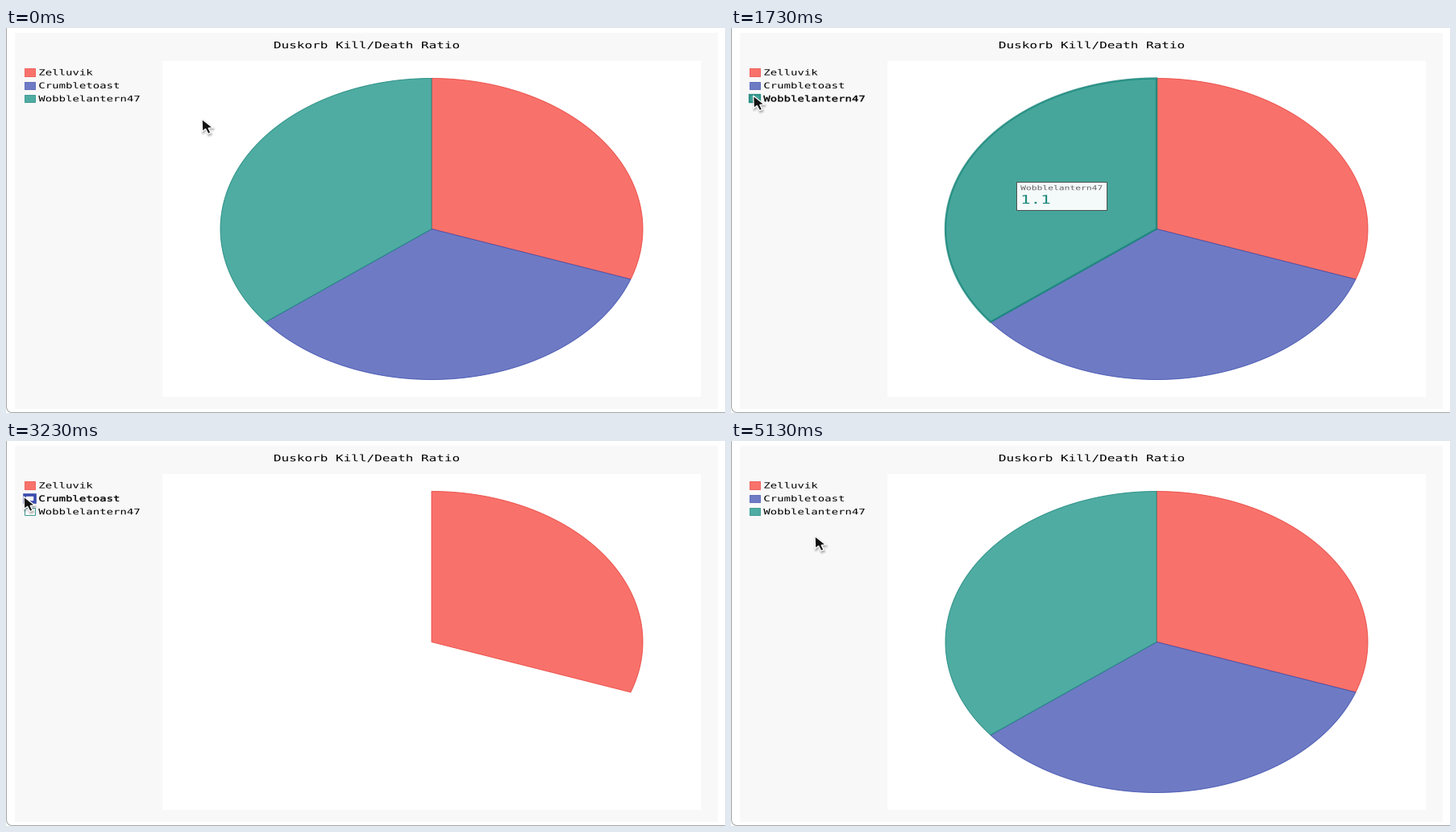
A matplotlib script that plays this animation: 892x478 px, repeating every 5.17 s.

```python
import numpy as np
import matplotlib.pyplot as plt
from matplotlib.animation import FuncAnimation
from matplotlib.colors import to_rgb
from matplotlib.patches import PathPatch, Polygon, Rectangle
from matplotlib.path import Path
from matplotlib.textpath import TextPath
from matplotlib.transforms import Affine2D

W, H, DPI = 892, 478, 100
PX = 72 / DPI                # points per pixel
LOOP, STEP = 5170, 22
CENTER, RADIUS = np.array([528, 249.5]), 262
SQUASH = 187 / 262           # the whole chart is flattened vertically
CHAR = 0.602                 # monospace advance in em
ROW = 16.3                   # legend line spacing

plt.rcParams["font.family"] = "DejaVu Sans Mono"

fig = plt.figure(figsize=(W / DPI, H / DPI), dpi=DPI, facecolor="white")
ax = fig.add_axes([0, 0, 1, 1])
ax.set_xlim(0, W)
ax.set_ylim(H, 0)
ax.axis("off")


def add(patch):
    ax.add_patch(patch)
    return patch


def box(x0, y0, x1, y1, color):
    return add(Rectangle((x0, y0), x1 - x0, y1 - y0, fc=color, lw=0))


def glyphs(text, size, x, y):
    flat = Affine2D().scale(1, -SQUASH).translate(x, y)
    return flat.transform_path(TextPath((0, 0), text, size=size))


def write(text, size, x, y, color="black"):
    return add(PathPatch(glyphs(text, size, x, y), fc=color, ec=color, lw=0))


def smooth(p):
    p = np.clip(p, 0, 1)
    return p * p * (3 - 2 * p)


def mix(a, b, p):
    return tuple(np.array(to_rgb(a)) * (1 - p) + np.array(to_rgb(b)) * p)


def on_pie(angle, reach=1.0):
    a = np.radians(angle)
    return CENTER + RADIUS * reach * np.array([np.sin(a), -np.cos(a) * SQUASH])


class Serie:
    def __init__(self, row, name, value, span, fill, lit, line):
        self.name, self.value, self.line = name, value, line
        self.fill, self.lit = fill, lit
        self.middle = on_pie(sum(span) / 2, 0.5)
        rim = [on_pie(a) for a in np.linspace(*span, 90)]
        self.slice = add(Polygon([CENTER] + rim, joinstyle="miter",
                                 ec=(*to_rgb(line), 0.8)))
        self.top = 50 + ROW * row
        self.swatch = add(Rectangle((22.5, self.top + 0.3), 13, 9.2, ec=line,
                                    joinstyle="miter"))
        self.label = write(name, 14, 40.3, self.top + 8.6)

    def in_legend(self, tip):
        return 20 < tip[0] < 36 and 0 < tip[1] - self.top < 7.2

    def in_pie(self, tip):
        return self.slice.get_path().contains_point(tip)

    def update(self, shown, bold, slice_glow, swatch_glow):
        self.slice.set_visible(shown)
        self.slice.set_facecolor(mix(self.fill, self.lit, slice_glow))
        self.slice.set_linewidth((1 + 2.6 * slice_glow) * PX)
        self.swatch.set_facecolor(
            mix(self.fill, self.lit, swatch_glow) if shown else "#fafafa")
        self.swatch.set_edgecolor(mix(self.line, "white", 0.2 - 0.2 * swatch_glow))
        self.swatch.set_linewidth((1 + 2.6 * swatch_glow) * PX)
        self.label.set_linewidth(0.35 * PX * bold)


class Tooltip:
    def __init__(self):
        self.frame = add(Rectangle((0, 0), 1, 35, fc="white", ec="#4a4a4a",
                                   lw=PX))
        self.name = write("x", 11.3, 0, 0, "#6a6264")
        self.value = write("0", 20.8, 0, 0)

    def update(self, serie, center, alpha):
        for part in (self.frame, self.name, self.value):
            part.set_visible(alpha > 0.02)
            part.set_alpha(alpha)
        self.frame.set_alpha(0.95 * alpha)
        width = len(serie.name) * 11.3 * CHAR + 10
        x, y = center - (width / 2, 17.7)
        self.frame.set_xy((x, y))
        self.frame.set_width(width)
        self.name.set_path(glyphs(serie.name, 11.3, x + 5, y + 10.3))
        self.value.set_path(glyphs(str(serie.value), 20.8, x + 5, y + 27.2))
        self.value.set_color(serie.line)


class Cursor:
    shape = np.array([(0, 0), (0.6, 15.5), (4.6, 12.3), (7.8, 18.4),
                      (11, 17.2), (8.2, 11.3), (13.6, 10.8)])

    def __init__(self):
        self.shadows = [add(Polygon(self.shape, fc="black", ec="black",
                                    lw=w * PX, alpha=0.06, joinstyle="round"))
                        for w in (1, 3, 5)]
        self.arrow = add(Polygon(self.shape, fc="#111111", ec="white",
                                 lw=1.3 * PX, joinstyle="round"))

    def update(self, tip):
        self.arrow.set_xy(self.shape + tip)
        for shadow in self.shadows:
            shadow.set_xy(self.shape + tip + (0.8, 2))


# window edge and page
add(PathPatch(Path([(0.5, 0), (0.5, 469), (0.5, 477.5), (8, 477.5), (W, 477.5)],
                   [1, 2, 3, 3, 2]), fc="none", ec="#a4a6a8", lw=PX))
box(11, 6, 883, 473, "#f8f8f8")
box(194, 41, 862, 457.5, "white")

title = "Duskorb Kill/Death Ratio"
write(title, 16, 447.5 - len(title) * 16 * CHAR / 2, 25.2)

names = ["Zelluvik", "Crumbletoast", "Wobblelantern47"]
values = [0.94, 1.05, 1.1]
colors = [("#f8726b", "#f7615a", "#e9403a"),
          ("#6e7bc4", "#5b69bb", "#3b4bad"),
          ("#4faca2", "#3ea194", "#17857a")]
turns = 360 * np.cumsum([0] + values) / sum(values)
series = [Serie(i, names[i], values[i], turns[i:i + 2], *colors[i])
          for i in range(3)]
red, blue, teal = series
tooltip, cursor = Tooltip(), Cursor()

# cursor moves: start, end, goal
START = np.array([243.0, 113.0])
MOVES = [(30, 270, (400, 158)), (570, 890, (589, 162)),
         (1330, 1735, (27, 84)), (2070, 2320, (24, 59)),
         (2320, 2570, (22, 69)), (3600, 3760, (23, 90)),
         (3870, 3960, (25, 86)), (4130, 4400, (23, 68)),
         (4720, 5130, (104, 118))]
CLICKS = [(2070, teal), (3030, blue), (4030, teal), (4630, blue)]


def cursor_at(t):
    tip = START
    for begin, end, goal in MOVES:
        tip = tip + (goal - tip) * smooth((t - begin) / (end - begin))
    return tip


def is_shown(serie, t):
    return sum(s is serie and t >= when for when, s in CLICKS) % 2 == 0


def play():
    """Follow the cursor through one loop and record what every frame shows."""
    slice_glow, swatch_glow = np.zeros(3), np.zeros(3)
    told, spot, alpha, last_touch = teal, teal.middle, 0.0, -LOOP
    for t in np.arange(LOOP // STEP) * STEP + STEP / 2:
        tip = cursor_at(t)
        legend = np.array([s.in_legend(tip) for s in series])
        pie = np.array([s.in_pie(tip) for s in series])
        swatch_glow = swatch_glow + 0.3 * (legend - swatch_glow)
        slice_glow = slice_glow + 0.3 * ((legend | pie) - slice_glow)
        if pie.any():
            told, last_touch = series[pie.argmax()], t
        spot = spot + 0.6 * (told.middle - spot)
        alpha += 0.5 * ((t - last_touch < 1000) - alpha)
        shown = [is_shown(s, t) for s in series]
        yield (tip, list(zip(shown, legend, slice_glow, swatch_glow)),
               (told, spot, alpha))


history = list(play())


def draw(i):
    tip, states, tip_state = history[i]
    for serie, state in zip(series, states):
        serie.update(*state)
    tooltip.update(*tip_state)
    cursor.update(tip)
    return []


anim = FuncAnimation(fig, draw, frames=len(history), interval=STEP,
                     init_func=lambda: draw(0), repeat=True, repeat_delay=0,
                     blit=False)
plt.show()
```
